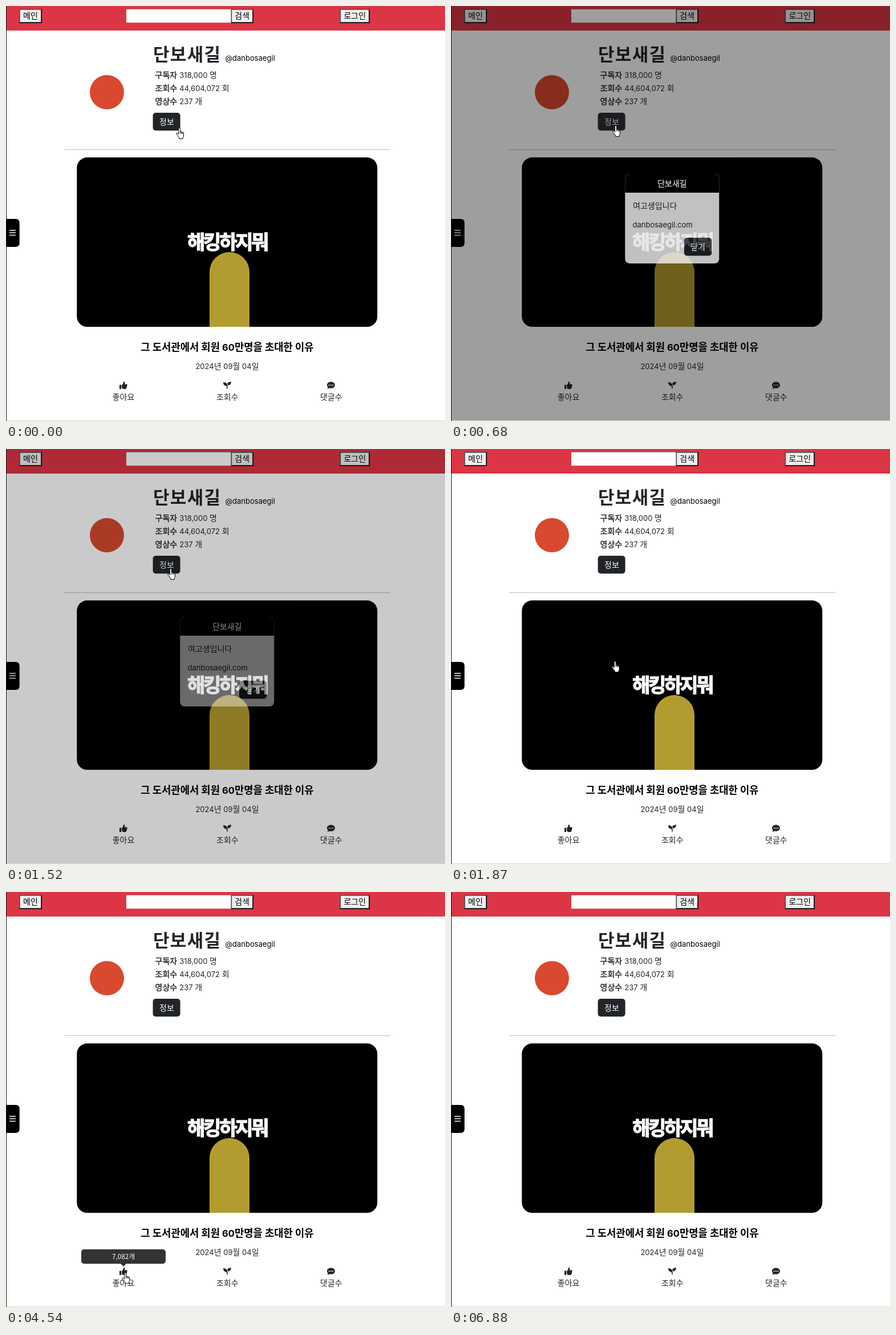
An HTML page for the animation above (7.01 s loop, 770x727 px).

```html
<!DOCTYPE html>
<html lang="ko">
<head>
<meta charset="utf-8">
<title>Channel page</title>
<style>
  html, body { margin: 0; width: 100%; height: 100%; overflow: hidden; background: #fff; }
  svg { display: block; width: 770px; height: 727px; }
  text { font: 14px Inter, "Noto Sans CJK KR", "Noto Sans CJK", sans-serif; color: #212529; fill: currentColor; white-space: pre; }
  .latin { font-size: .93em; }
  .mid { text-anchor: middle; }
  .medium { stroke: currentColor; stroke-width: .4px; }
  .light { color: #fff; }
  .black { color: #000; }
  .name { font-size: 31px; font-weight: 700; letter-spacing: 1.3px; }
  .cover { font-size: 34px; font-weight: 900; letter-spacing: -3.2px; color: #fff; stroke: #fff; stroke-width: 1.3px; }
  .headline { font-size: 17.8px; font-weight: 700; fill: #000; }
  .tip text { font: 11.7px "Noto Sans CJK KR", "Noto Sans CJK", sans-serif; color: #fff; }
  .tip, #modal, #shade { opacity: 0; }
</style>
</head>
<body>
<svg id="stage" viewBox="0 0 770 727" xmlns="http://www.w3.org/2000/svg">
  <rect width="770" height="43" fill="#dc3545"/>
  <g id="nav">
    <rect x="211" y="5" width="184" height="2" fill="#767676"/>
    <rect x="211" y="5.8" width="184" height="23.4" fill="#fff"/>
  </g>

  <circle cx="177" cy="151" r="30" fill="#d8492f"/>
  <rect id="info" x="257.6" y="187" width="48" height="31.3" rx="5" fill="#212529"/>
  <rect x="102" y="251" width="572" height="1.2" fill="#c8c8c9"/>

  <rect x="124.3" y="265.3" width="527" height="296.8" rx="18"/>
  <g id="cover"></g>
  <path d="M357 562V466a35 35 0 0 1 70 0V562Z" fill="#b39c2f"/>

  <g id="copy"></g>

  <g fill="#212529">
    <g transform="translate(199 657.5)">
      <rect y="6" width="3.2" height="7.6" rx=".8"/>
      <path d="M4.2 6.4Q6.6 4.6 7 1.6Q7.3.3 8.5.5Q9.8.9 9.5 2.9L8.9 5H12.6Q14 5.2 13.8 6.6Q13.7 7.3 13 7.7Q13.9 8.8 12.7 9.9Q13.2 11.1 12 11.8Q12 13.4 10.4 13.4H7.6Q6.5 13.4 5.6 12.7L4.2 11.8Z"/>
    </g>
    <g transform="translate(381 657.5)">
      <path d="M0 1.6Q6.6 1.6 7.7 8V12.6Q7 13.8 6.2 12.6V8.4Q0 8 0 1.6Z"/>
      <path d="M14 .7Q13.8 6.4 8.6 7.3Q8.3 5.3 7 3.7Q9 .7 14 .7Z"/>
    </g>
    <g transform="translate(563 657.5)">
      <path d="M7 1C11 1 14 3.4 14 6.6S11 12.2 7 12.2Q5.6 12.2 4.4 11.8Q2.6 13.2.4 13.2Q1.7 11.8 1.7 10.3Q0 8.7 0 6.6C0 3.4 3 1 7 1Z"/>
      <g fill="#fff"><circle cx="3.7" cy="6.7" r="1"/><circle cx="7" cy="6.7" r="1"/><circle cx="10.3" cy="6.7" r="1"/></g>
    </g>
  </g>
  <g id="tips"></g>

  <path d="M0 373H17q6.7 0 6.7 7V415q0 7-6.7 7H0Z"/>
  <path d="M6 393H17M6 397.3H17M6 401.6H17" stroke="#fff" stroke-width="1.5"/>

  <rect id="shade" width="770" height="726"/>
  <g id="modal">
    <rect x="305.3" y="294" width="165" height="157" rx="8" fill="#fff"/>
    <path d="M305.3 327V302q0-8 8-8H462.3q8 0 8 8V327Z"/>
    <path d="M305.5 302q0-7.5 7.5-7.5M462.5 294.5q7.5 0 7.5 7.5" fill="none" stroke="#555" stroke-width=".8"/>
    <rect x="409" y="406" width="48.3" height="31.5" rx="5" fill="#212529"/>
  </g>

  <rect width="1" height="727" fill="#111"/>
  <rect x="1" y="726" width="769" height="1" fill="#d8d8d8"/>

  <g id="hand" stroke="#000" stroke-linejoin="round" stroke-linecap="round">
    <path d="M4.6 11.5V1.9a1.5 1.5 0 0 1 3 0V7.2q1.6-.9 2.1.5q1.6-.6 2 .7q1.8-.3 1.8 1.4V14q0 2-1.3 3.6V19.5H5.8V18Q4.2 16 2.6 13.6L.9 11.2Q.5 9.6 2.2 9.6Q3.4 10 4.6 11.5Z" fill="#fff"/>
    <path d="M7.6 7.2V10M9.7 7.7V10.3M11.7 8.4V10.6" fill="none"/>
  </g>
</svg>
<script>
const LOOP = 7010;
const $ = id => document.getElementById(id);

function make(tag, attrs, parent) {
  const el = document.createElementNS('http://www.w3.org/2000/svg', tag);
  for (const k in attrs) el.setAttribute(k, attrs[k]);
  return parent.appendChild(el);
}

// Latin runs are set slightly smaller than Hangul.
function label(parent, x, y, words, cls = '') {
  const el = make('text', { x, y, class: cls }, parent);
  for (const run of words.match(/[ -~]+|[^ -~]+/g)) {
    const span = make('tspan', run.charCodeAt(0) < 128 ? { class: 'latin' } : {}, el);
    span.textContent = run;
  }
  return el;
}

function navButton(x, w, words) {
  const g = $('nav'), r = x + w;
  make('rect', { x, y: 5, width: w, height: 25, fill: '#4c4c4c' }, g);
  make('path', { d: `M${x} 30H${r}V5L${r - 2} 7V28H${x + 2}Z` }, g);
  make('rect', { x: x + 1.7, y: 6.7, width: w - 3.4, height: 21.6, fill: '#efefef' }, g);
  label(g, x + w / 2, 22, words, 'mid black');
}
navButton(23, 40, '메인');
navButton(394.5, 39.5, '검색');
navButton(585.5, 52.5, '로그인');

const copy = $('copy');
label(copy, 258, 95.5, '단보새길', 'name');
label(copy, 384.5, 95.5, '@danbosaegil', 'black');
[['구독자', '318,000 명'], ['조회수', '44,604,072 회'], ['영상수', '237 개']].forEach(([k, v], i) => {
  const y = 126 + i * 23.2;
  label(copy, 261.5, y, k, 'medium');
  label(copy, 304.3, y, v);
});
label(copy, 282, 207.5, '정보', 'mid light');
label($('cover'), 318, 425.5, '해킹하지뭐', 'cover');
const headline = label(copy, 388, 604, '그 도서관에서 회원 60만명을 초대한 이유', 'mid headline');
label(copy, 388, 636, '2024년 09월 04일', 'mid');
['좋아요', '조회수', '댓글수'].forEach((s, i) => label(copy, 206 + i * 182.2, 689.5, s, 'mid'));

const modal = $('modal');
label(modal, 388, 315.5, '단보새길', 'mid medium light');
label(modal, 319, 355.3, '여고생입니다');
label(modal, 318.5, 388, 'danbosaegil.com');
label(modal, 433.2, 427, '닫기', 'mid light');

const tips = ['7,082개', '351,206회', '1,024개'].map((s, i) => {
  const x = 206 + i * 182;
  const g = make('g', { class: 'tip' }, $('tips'));
  make('rect', { x: x - 74, y: 626, width: 148, height: 25.2, rx: 5, fill: '#333' }, g);
  make('path', { d: `M${x - 5} 651H${x + 5}L${x} 656Z`, fill: '#333' }, g);
  make('text', { x, y: 643, class: 'mid' }, g).textContent = s;
  return g;
});

// Steps are [time, value, easing towards the next step].
function play(el, prop, steps) {
  const all = [[0, steps[0][1]], ...steps, [LOOP, steps[steps.length - 1][1]]];
  el.animate(all.map(([t, v, easing = 'linear']) => ({ offset: t / LOOP, [prop]: v, easing })),
    { duration: LOOP, iterations: Infinity });
}

// Value a turns to b and back again.
function pulse(el, prop, a, b, on, off, span) {
  play(el, prop, [[on, a, 'ease'], [on + span, b], [off, b, 'ease'], [off + span, a]]);
}

pulse($('info'), 'fill', '#212529', '#424649', 70, 620, 150);
pulse($('shade'), 'opacity', 0, .5, 452, 1352, 500);
pulse(modal, 'opacity', 0, 1, 452, 1352, 500);
pulse(headline, 'fill', '#000', '#f00', 2400, 3560, 500);
pulse(tips[0], 'opacity', 0, 1, 4010, 4590, 300);
pulse(tips[1], 'opacity', 0, 1, 4730, 5290, 300);
pulse(tips[2], 'opacity', 0, 1, 5420, 6460, 300);

play($('hand'), 'transform', [
  [70, 298, 213, 'ease-out'], [210, 283, 209],
  [1650, 283, 209, 'ease-in'], [1930, 281, 449], [2300, 278, 572, 'ease-out'], [2700, 279, 588],
  [3510, 279, 588, 'ease-in-out'], [4180, 202, 666],
  [4520, 202, 666, 'ease-in'], [4760, 300, 681, 'ease-out'], [5000, 384, 670],
  [5210, 384, 670, 'ease-in'], [5450, 480, 678, 'ease-out'], [5690, 566, 670],
  [6380, 566, 670, 'ease-in'], [6820, 704, 732]
].map(([t, x, y, e]) => [t, `translate(${x}px, ${y}px)`, e]));
</script>
</body>
</html>
```
